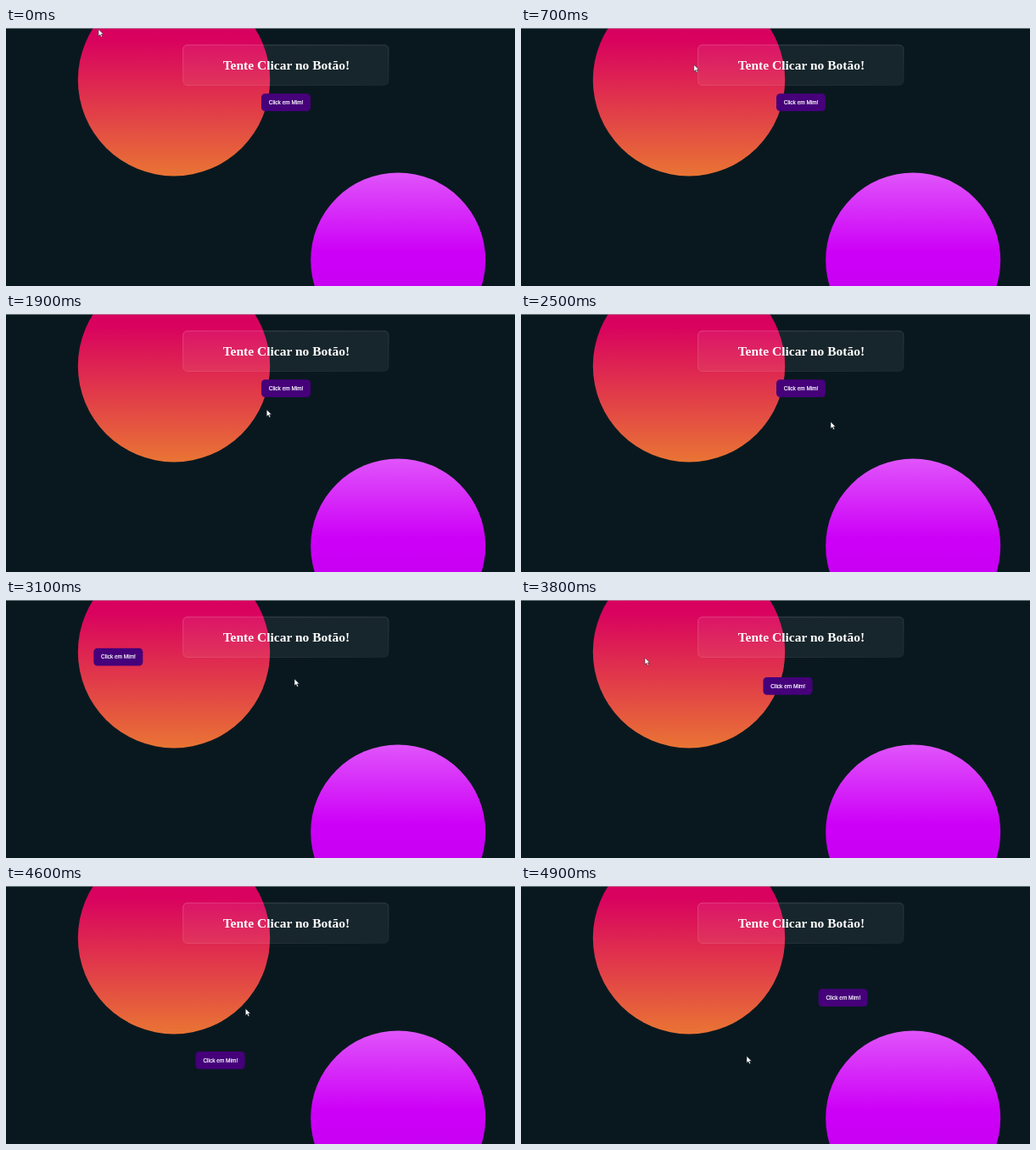
Animation, 600 px wide and 304 px high, one loop 5000 ms. Source, as an HTML page:

```html
<!DOCTYPE html>
<html lang="pt-BR">
<head>
<meta charset="utf-8">
<title>Tente Clicar no Botão!</title>
<style>
  html, body { margin: 0; width: 100%; height: 100%; overflow: hidden; background: #09181f; }
  svg { display: block; width: 100vw; height: 100vh; }
  .title { font: bold 15.5px "Liberation Serif", "Times New Roman", serif; }
  .label { font: 6.5px "Liberation Sans", Arial, sans-serif; stroke: #fff; stroke-width: .2; }
  text { fill: #fff; text-anchor: middle; }
</style>
</head>
<body>
<svg viewBox="0 0 600 304">
  <defs>
    <linearGradient id="sunset" gradientUnits="userSpaceOnUse" x1="0" y1="0" x2="0" y2="174">
      <stop offset="0" stop-color="#d8005f"/>
      <stop offset=".1" stop-color="#d9045e"/>
      <stop offset="1" stop-color="#e97434"/>
    </linearGradient>
    <linearGradient id="violet" gradientUnits="userSpaceOnUse" x1="0" y1="170" x2="0" y2="304">
      <stop offset="0" stop-color="#e055fa"/>
      <stop offset=".7" stop-color="#cd00f7"/>
      <stop offset="1" stop-color="#c800f3"/>
    </linearGradient>
    <linearGradient id="rim" x1="0" y1="0" x2="1" y2="1">
      <stop offset="0" stop-color="#fff" stop-opacity=".26"/>
      <stop offset="1" stop-color="#fff" stop-opacity=".04"/>
    </linearGradient>
  </defs>
  <rect width="600" height="304" fill="#09181f"/>
  <circle cx="198" cy="61.2" r="113.2" fill="url(#sunset)"/>
  <circle cx="462.2" cy="273.5" r="103" fill="url(#violet)"/>
  <rect width="600" height="1" fill="#aab4b8" opacity=".6"/>
  <rect x="208.7" y="20" width="242.3" height="47.5" rx="5" fill="#fff" fill-opacity=".06" stroke="url(#rim)" stroke-width=".8"/>
  <text class="title" x="330.4" y="49">Tente Clicar no Botão!</text>
  <g id="button">
    <rect width="58" height="20.8" rx="4.5" fill="#45007a"/>
    <text class="label" x="29.2" y="12.7">Click em Mim!</text>
  </g>
  <path id="cursor" d="M0 0V8L1.9 6.3L3.2 9.2L4.6 8.6L3.3 5.8H5.8Z" fill="#fff" stroke="#10181c" stroke-width=".5" stroke-linejoin="round"/>
</svg>
<script>
const LOOP = 5000, STEP = 100;
const WIDTH = 58, HEIGHT = 20.8;

// Key points of the pointer tip
const path = [
  { t: 0, x: 109, y: 1.5 },
  { t: 1300, x: 285, y: 79 },
  { t: 1700, x: 288, y: 108 },
  { t: 2500, x: 365, y: 127 },
  { t: 3100, x: 340, y: 93 },
  { t: 3800, x: 146, y: 68 },
  { t: 4300, x: 290, y: 101 },
  { t: 4600, x: 282.3, y: 144.5 },
  { t: 4900, x: 266, y: 200.5 }
];

// Places the button flees to, in turn
const spots = [
  { x: 301, y: 77.2 },
  { x: 103.3, y: 56.8 },
  { x: 285.5, y: 91 },
  { x: 223.6, y: 195 },
  { x: 350.6, y: 121.2 }
];

const button = document.getElementById("button");
const cursor = document.getElementById("cursor");

function pointerAt(t) {
  const next = path.findIndex(p => p.t > t);
  if (next < 0) return path[path.length - 1];
  const a = path[next - 1], b = path[next];
  const u = (t - a.t) / (b.t - a.t);
  return { x: a.x + (b.x - a.x) * u, y: a.y + (b.y - a.y) * u };
}

function touches(p, spot) {
  return p.x > spot.x && p.x < spot.x + WIDTH
    && p.y > spot.y && p.y < spot.y + HEIGHT;
}

// The button jumps on every touch since the loop began
function buttonAt(t) {
  let i = 0;
  for (let s = 0; s <= t; s += STEP) {
    if (touches(pointerAt(s), spots[i])) i = (i + 1) % spots.length;
  }
  return spots[i];
}

function place(node, { x, y }) {
  node.setAttribute("transform", `translate(${x} ${y})`);
}

function draw(ms) {
  const t = Math.floor((ms % LOOP) / STEP) * STEP;
  place(cursor, pointerAt(t));
  place(button, buttonAt(t));
}

let start;
function tick(now) {
  start ??= now;
  draw(now - start);
  requestAnimationFrame(tick);
}
draw(0);
requestAnimationFrame(tick);
</script>
</body>
</html>
```
